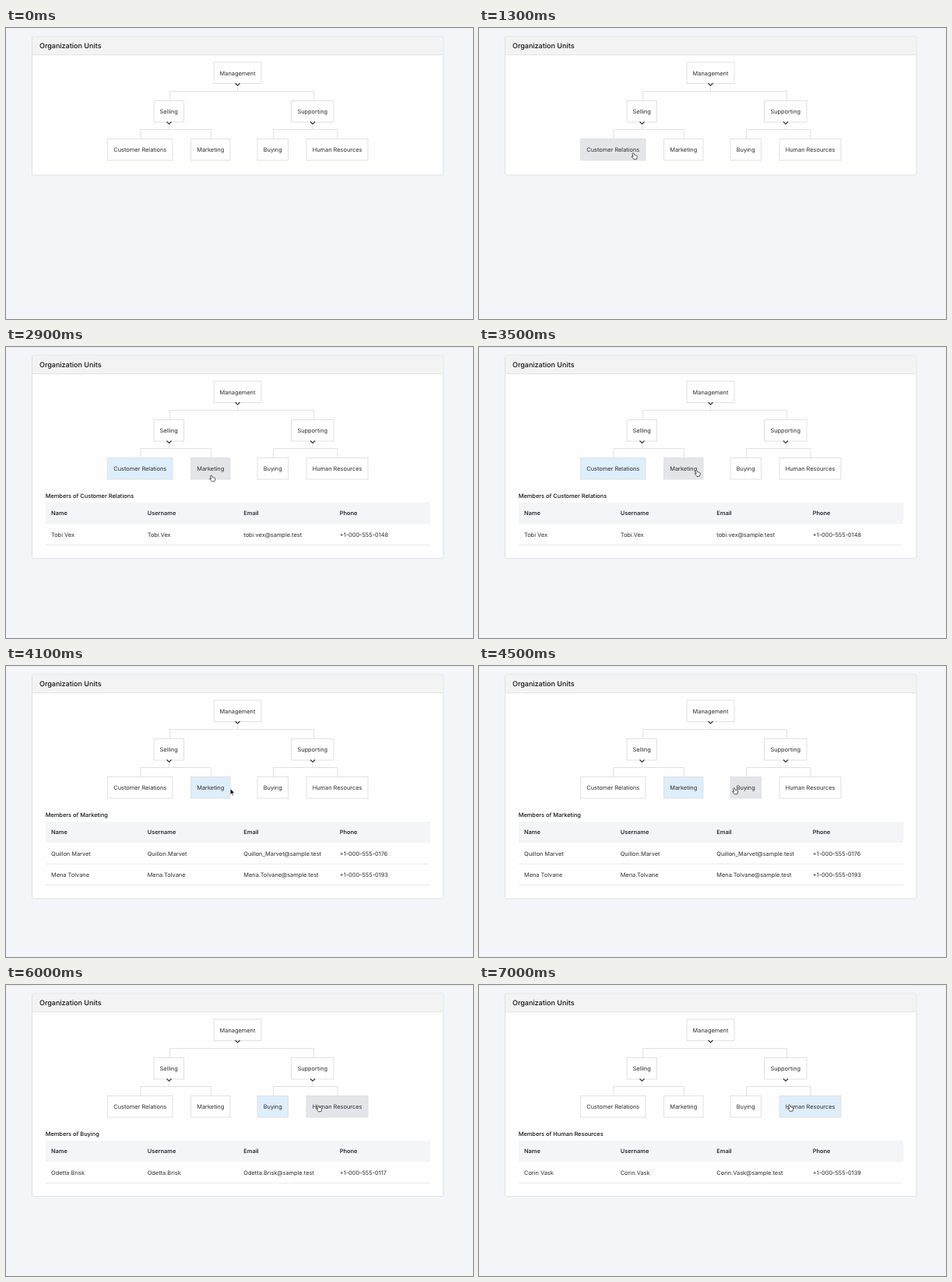
These frames come from a looping animation (600 px wide and 374 px high, 7.7 s). An HTML page:

```html
<!DOCTYPE html>
<html lang="en">
<head>
<meta charset="utf-8">
<title>Organization Units</title>
<style>
  html, body { margin: 0; width: 100%; height: 100%; overflow: hidden; background: #f4f5f8; }
  svg { display: block; width: 100%; height: 100%; }
  text { font: 400 7.4px Inter, sans-serif; fill: #2c2c31; text-rendering: geometricPrecision; }
  .title { font-size: 9px; font-weight: 500; fill: #111; }
  .caption { font-weight: 500; fill: #111; }
  .head { font-weight: 600; }
  .node text { text-anchor: middle; }
  .node rect, .links { stroke: #dfe1e5; }
  .links, .chevrons { fill: none; }
  .chevrons { stroke: #333; stroke-width: 1.1; }
</style>
</head>
<body>
<svg viewBox="0 0 600 374">
  <rect width="600" height="1" fill="#ebeff7"/>
  <rect id="panel" x="33.5" y="11" width="528.5" rx="2" fill="#fefefe" stroke="#dfe1e5"/>
  <path d="M34 34.5V13q0-1.5 1.5-1.5H560q1.5 0 1.5 1.5V34.5Z" fill="#f3f3f4"/>
  <path d="M34 34.5H561.5" stroke="#e3e4e7"/>
  <text class="title" x="43" y="25.6">Organization Units</text>
  <path class="links" d="M297.5 76V81.5M210.5 93V81.5H395.5V93
    M209.5 125V130.5M173 142V130.5H263.5V142M394 125V130.5M343.5 142V130.5H426V142"/>
  <g id="nodes"></g>
  <path class="chevrons" d="M294.5 71l3 3 3-3M206.5 120.500l3 3 3-3M391 120.500l3 3 3-3"/>
  <g id="table"></g>
  <g id="cursor" stroke-linejoin="round">
    <path id="arrow" stroke="#fff" stroke-width=".6"
      d="M0 0V7.500L1.700 6 2.900 8.800 4 8.300 2.900 5.600 5.300 5.400Z"/>
    <g id="hand" transform="translate(-2 -.5)" fill="#fff" stroke="#222" stroke-width=".75">
      <path d="M2.200 .8C2.800 .4 3.300 .8 3.500 1.400L4.200 3.300C5 3 5.400 3.200 5.600 3.700 6.200 3.400 6.700 3.600 6.800 4.100
        7.500 4 7.900 4.400 7.800 5.200 7.700 6.600 7.200 7.200 6.900 8.600L3.400 8.800C2.800 7.600 1.600 6.800 .7 5.600
        .3 4.900 1.200 4.500 1.900 5L2.700 5.700 1.600 1.900C1.500 1.300 1.700 .9 2.200 .8Z"/>
    </g>
  </g>
</svg>
<script>
const LOOP = 7700, STEP = 100;
const $ = id => document.getElementById(id);

// label, left, top, width
const nodes = [
  ['Management', 267, 44, 61], ['Selling', 190, 93.5, 38.5], ['Supporting', 366.5, 93.5, 54.5],
  ['Customer Relations', 130.5, 142.5, 83.5], ['Marketing', 237.5, 142.5, 50.5],
  ['Buying', 323, 142.5, 39.5], ['Human Resources', 386, 142.5, 79]
];
const NODE_HEIGHT = 27.5, FIRST_LEAF = 3;
const columns = [58, 181.7, 305.3, 428.8];

const person = (name, user, mail, phone) => [name, user, mail + '@sample.test', phone];
const members = {
  3: [person('Tobi Vex', 'Tobi.Vex', 'tobi.vex', '+1-000-555-0148')],
  4: [person('Quillon Marvet', 'Quillon.Marvet', 'Quillon_Marvet', '+1-000-555-0176'),
      person('Mena Tolvane', 'Mena.Tolvane', 'Mena.Tolvane', '+1-000-555-0193')],
  5: [person('Odetta Brisk', 'Odetta.Brisk', 'Odetta.Brisk', '+1-000-555-0117')],
  6: [person('Corin Vask', 'Corin.Vask', 'Corin.Vask', '+1-000-555-0139')]
};

// time, selected node
const clicks = [[0, -1], [2000, 3], [3600, 4], [5100, 5], [6500, 6]];

// time, x, y of the pointer's hot spot
const path = [
  [100, 486, 358], [200, 464, 332], [300, 450, 313], [600, 450, 313],
  [700, 398, 262], [800, 270, 190], [900, 203.5, 162], [1100, 203.5, 162],
  [1300, 197.5, 160.5], [2300, 197.5, 160.5], [2500, 152, 165], [2700, 185, 166],
  [3000, 302, 164], [3200, 300, 161], [3500, 278.5, 158], [4000, 278.5, 158],
  [4500, 327, 156.5], [5300, 327, 156.5], [5500, 371, 150], [5700, 406, 155],
  [6000, 400, 154.5], [6200, 400, 154.5], [6300, 398, 154], [LOOP, 398, 154]
];

const label = (x, y, content, cls = '') => `<text class="${cls}" x="${x}" y="${y}">${content}</text>`;
const rule = y => `<path d="M51 ${y}H545" stroke="#e9ebee"/>`;
const cells = (row, y, cls) => row.map((cell, i) => label(columns[i], y, cell, cls)).join('');

$('nodes').innerHTML = nodes.map(([name, x, y, w]) =>
  `<g class="node"><rect x="${x}" y="${y}" width="${w}" height="${NODE_HEIGHT}"/>` +
  label(x + w / 2, y + 16.6, name) + '</g>').join('');
const boxes = document.querySelectorAll('.node rect');

function pointerAt(t) {
  const i = path.findIndex(key => key[0] > t);
  const [t0, x0, y0] = path[i - 1], [t1, x1, y1] = path[i];
  const k = (t - t0) / (t1 - t0);
  return [x0 + (x1 - x0) * k, y0 + (y1 - y0) * k];
}

let shown;
function showMembers(selected) {
  if (selected === shown) return;
  shown = selected;
  const rows = members[selected] || [];
  $('panel').setAttribute('height', rows.length ? 233.5 + 27.2 * rows.length : 178);
  $('table').innerHTML = rows.length ?
    label(50.7, 194.2, 'Members of ' + nodes[selected][0], 'caption') +
    '<rect x="51" y="200" width="494" height="27.3" fill="#f4f5f7"/>' +
    cells(['Name', 'Username', 'Email', 'Phone'], 216.3, 'head') +
    rows.map((row, i) => cells(row, 243.5 + 27.2 * i) + rule(254.5 + 27 * i)).join('') : '';
}

function render(now) {
  const t = Math.floor(now % LOOP / STEP) * STEP;
  const selected = clicks.filter(click => click[0] <= t).pop()[1];
  const visible = t >= path[0][0];
  const [x, y] = visible ? pointerAt(t) : [0, 0];
  const hovered = nodes.findIndex(([, left, top, w], i) => i >= FIRST_LEAF &&
    x >= left && x <= left + w && y >= top && y <= top + NODE_HEIGHT);

  showMembers(selected);
  boxes.forEach((box, i) => box.setAttribute('fill',
    i === selected ? '#deeefb' : i === hovered ? '#e4e5e9' : '#fff'));
  $('cursor').setAttribute('transform', `translate(${x} ${y})`);
  $('arrow').style.display = visible && hovered < 0 ? '' : 'none';
  $('hand').style.display = visible && hovered >= 0 ? '' : 'none';
}

function tick() {
  render(performance.now());
  requestAnimationFrame(tick);
}
tick();
</script>
</body>
</html>
```
